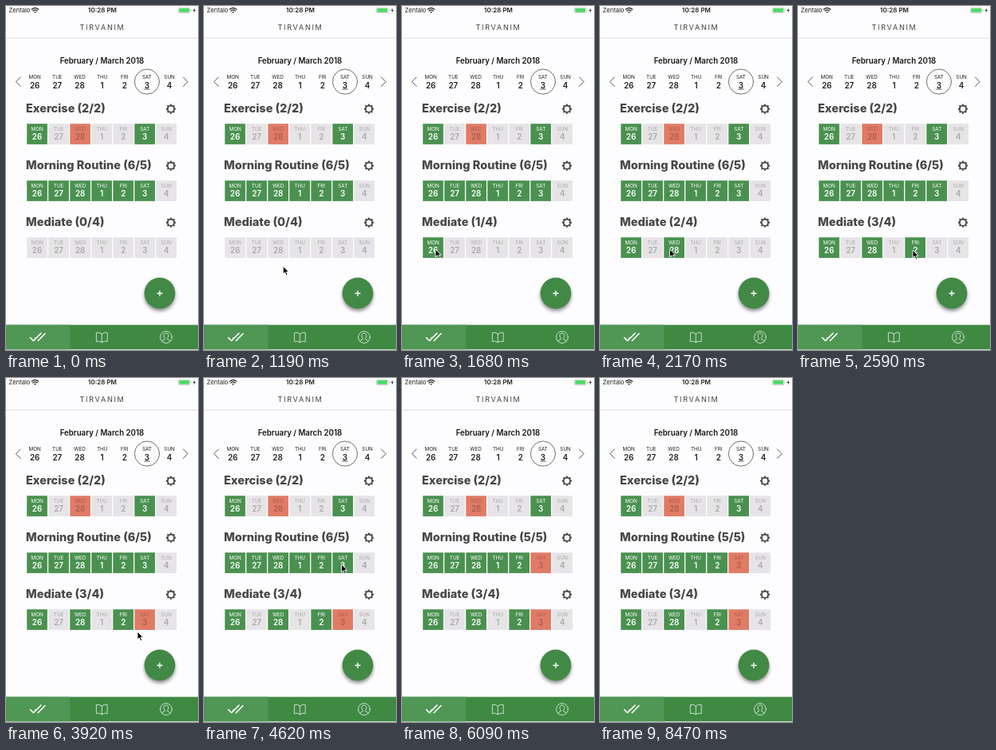
An HTML page for the animation above (9.03 s loop, 241 by 430 pixels).

```html
<!DOCTYPE html>
<html lang="en">
<head>
<meta charset="utf-8">
<title>Habit tracker</title>
<style>
  html, body { margin: 0; width: 100%; height: 100%; overflow: hidden; background: #fdfcfe; }
  svg { display: block; width: 100vw; height: 100vh; font-family: Inter, "Open Sans", sans-serif; }
  .mid { text-anchor: middle; }
  .status { font-size: 7.6px; fill: #222; }
  .clock { font-size: 8px; font-weight: 600; }
  .brand { font-size: 9.1px; letter-spacing: 1.7px; fill: #444; }
  .month { font-size: 9.7px; font-weight: 600; fill: #161616; }
  .day { font-size: 6.3px; }
  .date { font-size: 9.9px; font-weight: 600; }
  .name { font-size: 14.5px; font-weight: 800; fill: #474747; }
  .line { fill: none; stroke-linecap: round; stroke-linejoin: round; }
  .open rect { fill: #e6e4e6; }
  .open text { fill: #aaa8aa; }
  .done rect { fill: #4a9150; }
  .done text { fill: #fff; }
  .missed rect { fill: #e07b66; }
  .missed text { fill: #ab5d4e; }
  .fab { filter: drop-shadow(0 3px 2.2px rgba(0, 0, 0, .42)); }
</style>
</head>
<body>
<svg viewBox="0 0 241 430" preserveAspectRatio="none">
  <rect width="241" height="430" fill="#fdfcfe"/>

  <!-- status bar -->
  <text class="status" x="3.5" y="8.2">Zentalo</text>
  <g class="line" stroke="#222" stroke-width="1.2">
    <path d="M32.2 4.2Q36.5 .6 40.8 4.2M33.9 6Q36.5 3.8 39.1 6"/>
    <circle cx="36.5" cy="7.8" r=".4"/>
  </g>
  <text class="status clock mid" x="121" y="8.3">10:28 PM</text>
  <rect x="216.5" y="2.1" width="14.5" height="6.5" rx="1.4" fill="#fff" stroke="#999" stroke-width=".5"/>
  <rect x="217.4" y="3" width="12.7" height="4.7" rx=".6" fill="#4cd964"/>
  <path d="M232 4v2.6q1.3-1.3 0-2.6" fill="#888"/>
  <path d="M236.8 2.6l-2.1 3.3h1.6l-.5 2.6 2.2-3.4h-1.6z" fill="#222"/>

  <!-- header -->
  <text class="brand mid" x="121" y="29.8">TIRVANIM</text>
  <path d="M0 40H241" stroke="#e0dee0"/>
  <text class="month mid" x="120.5" y="72">February / March 2018</text>
  <g class="line" stroke="#444" stroke-width=".9">
    <path d="M18.2 89L12.5 94.7L18.2 100.4M222.5 89L228.2 94.7L222.5 100.4"/>
    <circle cx="177" cy="94.6" r="15.6" stroke-width=".75"/>
    <path d="M173.8 104H180.2"/>
  </g>
  <g id="week" fill="#222"></g>
  <g id="habits"></g>

  <!-- add button -->
  <circle class="fab" cx="193" cy="359" r="19.4" fill="#428945"/>
  <path d="M189.5 359.2h7M193 355.7v7" stroke="#fff" stroke-width="1.4"/>

  <!-- tab bar -->
  <rect y="398.6" width="241" height="30.7" fill="#3f8943"/>
  <rect y="398.6" width="80.4" height="30.7" fill="#509655"/>
  <g class="line" stroke="#fff" stroke-width=".85">
    <path d="M30.5 414.5L34.5 418.5L44 409M40.2 418.5L49 409.5M36.5 414.8L37.2 415.5" stroke-width="1.6"/>
    <g stroke-opacity=".85">
      <path d="M120.3 410Q117 407 113.4 408.5V419.5Q117 418 120.3 420.5Q123.6 418 127.2 419.5V408.5Q123.6 407 120.3 410V420.5"/>
      <circle cx="201" cy="414" r="7.4"/>
      <path d="M195.8 419Q196.5 417.3 199.3 416.6V415.2C197 412.5 198 409 201 409S205 412.5 202.7 415.2V416.6Q205.5 417.3 206.2 419"/>
    </g>
  </g>

  <path id="cursor" d="M0 0V9.8L2.3 7.7L3.9 11.5L5.7 10.7L4.1 7.1H7.2Z"
        fill="#000" stroke="#fff" stroke-width=".9" stroke-linejoin="round"/>
</svg>
<script>
const LOOP = 9030, STEP = 70;
const DAYS = ['MON', 'TUE', 'WED', 'THU', 'FRI', 'SAT', 'SUN'];
const STATES = ['open', 'done', 'missed'];

// one digit per day: index into STATES
const habits = [
  { name: 'Exercise', goal: 2, days: '1020010' },
  { name: 'Morning Routine', goal: 5, days: '1111110' },
  { name: 'Mediate', goal: 4, days: '0000000' }
];

// each tap moves a tile on to its next state
const taps = [
  { at: 1680, row: 2, day: 0 }, { at: 2170, row: 2, day: 2 }, { at: 2590, row: 2, day: 4 },
  { at: 3430, row: 2, day: 5 }, { at: 3710, row: 2, day: 5 }, { at: 4830, row: 1, day: 5 }
];

// pointer glides, each from where the last one ended
const show = 980, hide = 6090, origin = { x: 115, y: 331 };
const glides = [
  { from: 980, to: 1680, x: 42, y: 304 }, { from: 1680, to: 2170, x: 87.5, y: 304 },
  { from: 2170, to: 2590, x: 144, y: 305 }, { from: 3080, to: 3430, x: 168, y: 304 },
  { from: 3710, to: 3920, x: 165, y: 317 }, { from: 4200, to: 4620, x: 172.5, y: 233 },
  { from: 4830, to: 4970, x: 174, y: 235 }, { from: 5950, to: 6020, x: 212, y: 246 }
];

const svg = document.querySelector('svg');
const cursor = document.getElementById('cursor');

function add(parent, tag, attrs, text = '') {
  const el = document.createElementNS(svg.namespaceURI, tag);
  for (const key in attrs) el.setAttribute(key, attrs[key]);
  el.textContent = text;
  return parent.appendChild(el);
}

function addDay(parent, i, x, y, gap) {
  add(parent, 'text', { class: 'day mid', x, y }, DAYS[i]);
  add(parent, 'text', { class: 'date mid', x, y: y + gap }, i < 3 ? 26 + i : i - 2);
}

function addGear(parent, cx, cy) {
  const ring = { cx, cy, fill: 'none', stroke: '#454545' };
  add(parent, 'circle', { ...ring, r: 4.1, 'stroke-width': 1.8 });
  add(parent, 'circle', { ...ring, r: 5.4, 'stroke-width': 1.4, pathLength: 32, 'stroke-dasharray': '2 2', 'stroke-dashoffset': 1 });
}

const week = document.getElementById('week');
DAYS.forEach((_, i) => addDay(week, i, 36.2 + 28.15 * i, 91, 11.5));

const list = document.getElementById('habits');
habits.forEach((h, row) => {
  const y = 147.2 + 71 * row;
  h.title = add(list, 'text', { class: 'name', x: 25, y: y - 14.7 });
  addGear(list, 207, y - 18.5);
  h.tiles = DAYS.map((_, i) => {
    const g = add(list, 'g', {}), x = 26.2 + 27.03 * i;
    add(g, 'rect', { x, y, width: 25.7, height: 25.7 });
    addDay(g, i, x + 12.9, y + 9, 10.4);
    return g;
  });
});

function drawHabit(h, row, t) {
  const states = [...h.days].map(Number);
  for (const tap of taps) if (tap.row === row && t >= tap.at) states[tap.day]++;
  const key = states.join('');
  if (key === h.shown) return;
  h.shown = key;
  h.title.textContent = `${h.name} (${states.filter(s => s === 1).length}/${h.goal})`;
  h.tiles.forEach((el, i) => el.setAttribute('class', STATES[states[i]]));
}

function drawCursor(t) {
  let { x, y } = origin;
  for (const g of glides) {
    const k = Math.min(1, Math.max(0, (t - g.from) / (g.to - g.from)));
    const ease = k * k * (3 - 2 * k);
    x += (g.x - x) * ease;
    y += (g.y - y) * ease;
  }
  cursor.style.display = t >= show && t < hide ? '' : 'none';
  cursor.setAttribute('transform', `translate(${x} ${y})`);
}

const start = performance.now();
function tick() {
  const elapsed = (performance.now() - start) % LOOP;
  const t = Math.floor(elapsed / STEP) * STEP;
  habits.forEach((h, row) => drawHabit(h, row, t));
  drawCursor(t);
  requestAnimationFrame(tick);
}
tick();
</script>
</body>
</html>
```
